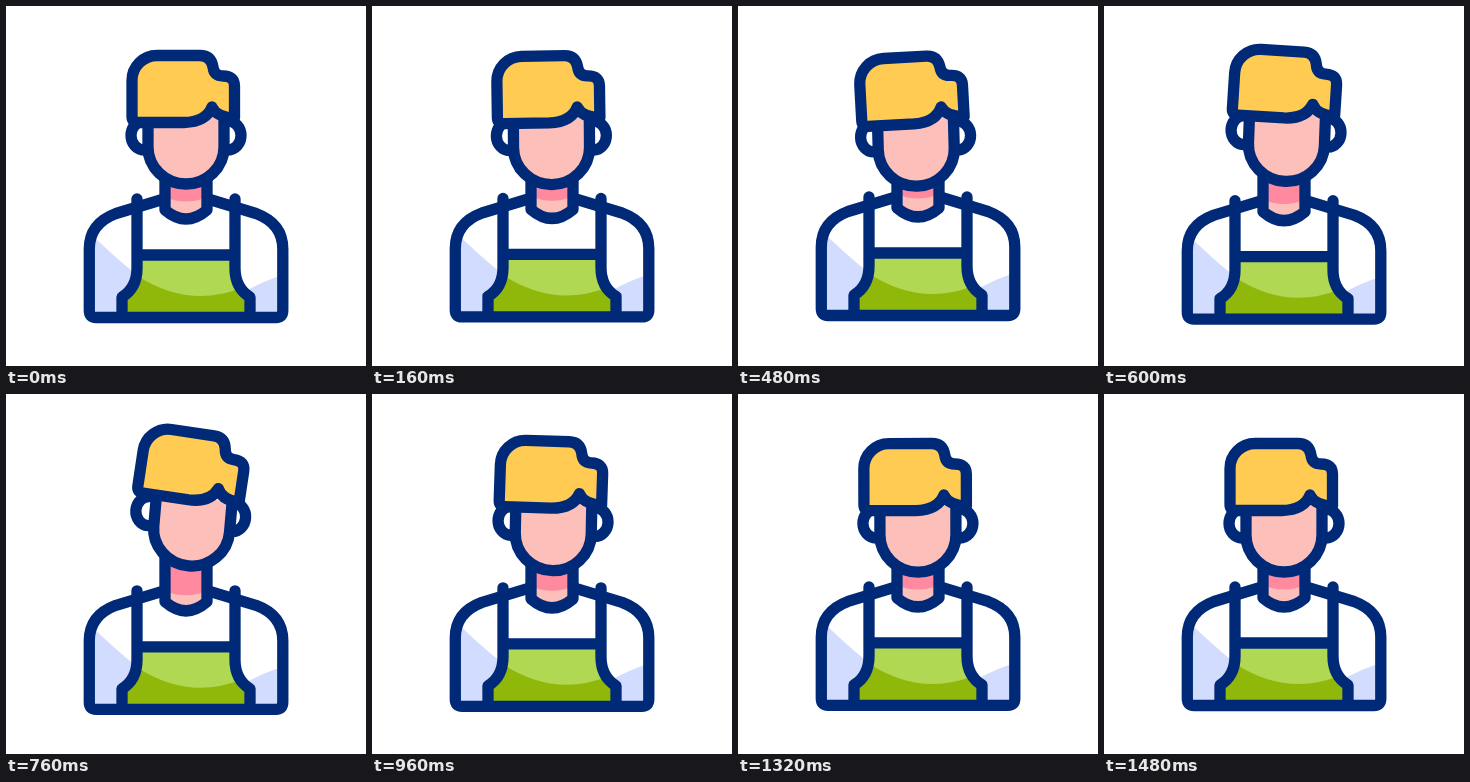
An HTML page for the animation above (1.52 s loop, 360x360 px).

```html
<!DOCTYPE html>
<html lang="en">
<head>
<meta charset="utf-8">
<title>Nodding worker</title>
<style>
  html, body { margin: 0; width: 100%; height: 100%; overflow: hidden; background: #fff; }
  svg { display: block; width: 100vw; height: 100vh; }
  .line { stroke: #002a78; stroke-width: 11.3; stroke-linecap: round; stroke-linejoin: round; }
</style>
</head>
<body>
<svg viewBox="0 0 360 360" fill="none">
  <g id="body">
    <path fill="#d2dcfe" d="M83 226Q106 249 131 269V311H83ZM277 269Q257 275 238 286V311H277Z"/>
    <path fill="#8fb80a" d="M131 249H229V262Q229 282 244 291V311H116V291Q131 282 131 262Z"/>
    <path fill="#b0d853" d="M131 249H229V262Q229 274 235 282Q182 303 130 269Z"/>
    <g class="line">
      <path d="M158 193L110 207.500Q83.300 217.500 83.300 243V304.500Q83.300 311.500 90 311.500H270Q276.800 311.500 276.800 304.500V243Q276.800 217.500 250 207.500L202 193"/>
      <path d="M131 193V262Q131 282 116 291V307M229 193V262Q229 282 244 291V307M131 249H229"/>
    </g>
    <path fill="#fcbfb9" d="M159 155V204Q180 222 201 204V155Z"/>
    <path id="shade" fill="#ff8aa0" d="M159 150V191Q180 200 201 191V150Z"/>
    <path class="line" d="M159 155V204Q180 222 201 204V155"/>
  </g>
  <path id="ears" class="line" d="M138 115A13 14.500 0 0 0 138 144M222 115A13 14.500 0 0 1 222 144"/>
  <path id="face" class="line" fill="#fcbfb9" d="M142 110V141A38 37 0 0 0 218 141V110"/>
  <path id="hair" class="line" fill="#ffcb52" d="M132 116.500H178Q200 116 206 101Q210 111 228.500 112V80Q228.500 70 217 70Q208 70 207 61Q205 49.500 194 49.500H151A25 25 0 0 0 126 74.500V110.500Q126 116.500 132 116.500Z"/>
</svg>
<script>
const LOOP = 1520, STEP = 40;
// [time, nod]: negative leans down and left, positive stretches up and right
const keys = [[0, 0], [100, 0], [360, -.65], [760, 1], [1070, -.08], [1400, 0], [LOOP, 0]];

function nodAt(t) {
  const i = keys.findIndex(k => k[0] > t);
  const [t0, a] = keys[i - 1], [t1, b] = keys[i];
  return a + (b - a) * (1 - Math.cos(Math.PI * (t - t0) / (t1 - t0))) / 2;
}

function place(id, x, y, angle = 0, pivot = '') {
  document.getElementById(id)
    .setAttribute('transform', `translate(${x} ${y}) rotate(${angle} ${pivot})`);
}

function draw(now) {
  const p = nodAt(Math.floor(now % LOOP / STEP) * STEP);
  const by = (down, up) => p * (p < 0 ? down : up);

  place('body', 0, by(6.5, 3.8));
  place('shade', 0, by(3, 2));
  place('ears', by(7, 4), by(-3, -9.5), 4 * p, '180 140');
  place('face', 4 * p, by(-7, -6), 5 * p, '180 160');
  place('hair', by(12.5, 9.5), by(-5, -10.5), by(10, 8.5), '177 82');
  requestAnimationFrame(draw);
}
draw(0);
</script>
</body>
</html>
```
